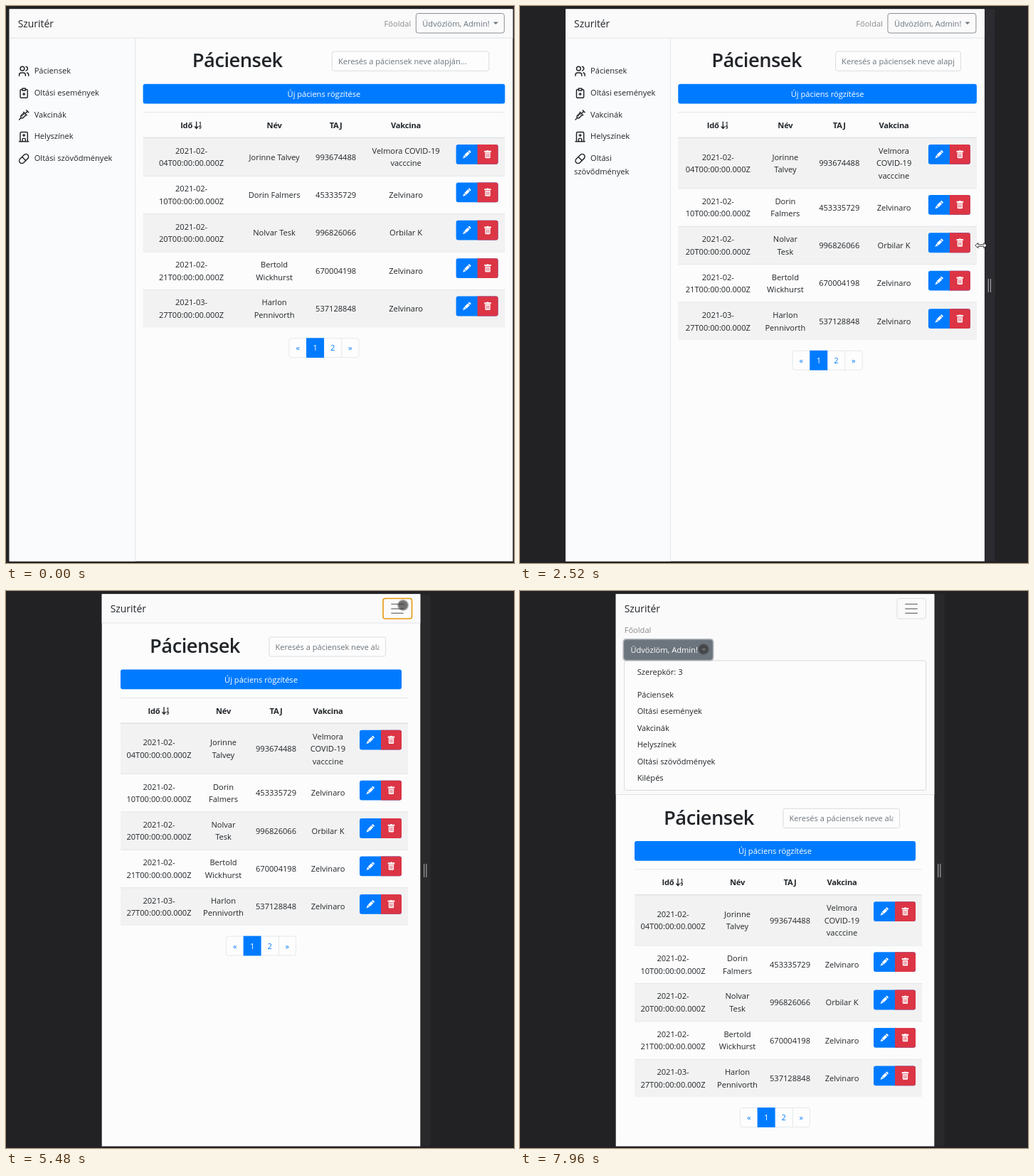
An HTML page that plays this animation: 714x784 px, repeating every 8000 ms.

```html
<!DOCTYPE html>
<html lang="hu">
<head>
<meta charset="utf-8">
<title>Páciensek</title>
<style>
html, body { margin: 0; width: 100%; height: 100%; overflow: hidden; background: #222224; }
#stage { display: block; width: 100%; height: 100%; font: 11.1px "Open Sans", "Noto Sans", sans-serif; fill: #212529; }
.mid { text-anchor: middle; }
.end { text-anchor: end; }
.brand { font-size: 13.9px; }
.title { font-size: 27.3px; font-weight: 600; letter-spacing: -.5px; }
.head { font-weight: 700; letter-spacing: -.2px; }
.tiny { font-size: 6.5px; font-weight: 700; }
.faint { fill: #8c8c8d; }
.gray { fill: #6c757d; }
.white { fill: #fff; }
.link { fill: #007bff; }
.icon { fill: none; stroke: #212529; stroke-width: 2; stroke-linecap: round; stroke-linejoin: round; }
</style>
</head>
<body>
<svg id="stage" viewBox="0 0 714 784">
  <defs>
    <radialGradient id="touch">
      <stop offset="0" stop-color="#333" stop-opacity=".72"/>
      <stop offset=".7" stop-color="#333" stop-opacity=".68"/>
      <stop offset="1" stop-color="#333" stop-opacity=".12"/>
    </radialGradient>
  </defs>
  <g id="scene"></g>
</svg>
<script>
const LOOP = 8000, STEP = 40;
const TOP = 4.4, BOTTOM = 781.6, NAV_BOTTOM = 45, CENTER = 358.5;
// The page is shown scaled down; sizes below follow from its CSS pixels
const SCALE = 0.7315, ROW = 73 * SCALE, LINE = 24 * SCALE, BUTTON = 38 * SCALE;
const LINE_COLOR = '#dee2e6', BLUE = '#007bff', RED = '#dc3545';

const MENU = ['Páciensek', 'Oltási események', 'Vakcinák', 'Helyszínek', 'Oltási szövődmények'];
const ICONS = [
  'M5 7a4 4 0 1 0 8 0a4 4 0 1 0-8 0M3 21v-2a4 4 0 0 1 4-4h4a4 4 0 0 1 4 4v2M16 3.1a4 4 0 0 1 0 7.8M21 21v-2a4 4 0 0 0-3-3.9',
  'M9 5H7a2 2 0 0 0-2 2v12a2 2 0 0 0 2 2h10a2 2 0 0 0 2-2V7a2 2 0 0 0-2-2h-2M9 3h6v4H9zM10 14h4M12 12v4',
  'M17 3l4 4M19 5l-4.5 4.5M11.5 6.5l6 6M16.5 11.5L10 18H6v-4l6.5-6.5M7.5 12.5L9 14M10.5 9.5L12 11M3 21l3-3',
  'M3 21h18M5 21V5a2 2 0 0 1 2-2h10a2 2 0 0 1 2 2v16M9 21v-4a2 2 0 0 1 2-2h2a2 2 0 0 1 2 2v4M10 9h4M12 7v4',
  'M4.5 12.5l8-8a4.9 4.9 0 0 1 7 7l-8 8a4.9 4.9 0 0 1-7-7M8.5 8.5l7 7'
];
const PENCIL = 'M12.2.1h.7l3 3v.7L14.2 5.5 10.5 1.8zM9.8 2.5l3.7 3.7L7 12.7 3.3 9zM2.7 9.6l3.7 3.7L.2 15.8z';
const TRASH = 'M1.5 1H6l1-1h2l1 1h4.5v3H1.5zM3 4.8h10V14a1.5 1.5 0 0 1-1.5 1.5h-7A1.5 1.5 0 0 1 3 14z';

// wrap: table width below which the name breaks into two lines
const PATIENTS = [
  { day: '2021-02-|04', name: 'Jorinne Talvey', wrap: 477, taj: '993674488', vaccine: 'Velmora COVID-19 vacccine' },
  { day: '2021-02-|10', name: 'Dorin Falmers', wrap: 463, taj: '453335729', vaccine: 'Zelvinaro' },
  { day: '2021-02-|20', name: 'Nolvar Tesk', wrap: 425, taj: '996826066', vaccine: 'Orbilar K' },
  { day: '2021-02-|21', name: 'Bertold Wickhurst', wrap: 999, taj: '670004198', vaccine: 'Zelvinaro' },
  { day: '2021-03-|27', name: 'Harlon Pennivorth', wrap: 999, taj: '537128848', vaccine: 'Zelvinaro' }
];

// table width, four column centres, left side of the row buttons
const COLUMNS = [[404, 54, 144.5, 218.5, 291.5, 336], [446.5, 59.5, 161, 240, 323.5, 378.5], [508, 68, 184.5, 271, 369.5, 440]];
const PANEL_LEFT = [[1640, 4.7], [2240, 46], [2480, 61], [2880, 91.7], [3320, 113], [3640, 129], [3840, 133], [3960, 133], [4080, 134.7]];
const RESIZE_CURSOR = [[1640, 712, 306], [2240, 668, 327], [2880, 622, 350], [3640, 586, 380], [4080, 584, 381]];
const TOUCH_TO_TOGGLE = [[4280, 584, 380], [4440, 566, 300], [4640, 545, 160], [4860, 534, 60], [5080, 558, 20]];

const clamp = v => Math.max(0, Math.min(1, v));
const lerp = (a, b, k) => a + (b - a) * k;

// Piecewise linear values over the first item of each key
function track(keys, at) {
  let i = 1;
  while (i < keys.length - 1 && keys[i][0] < at) i++;
  const a = keys[i - 1], b = keys[i], k = clamp((at - a[0]) / (b[0] - a[0]));
  return a.slice(1).map((v, n) => lerp(v, b[n + 1], k));
}

// y is the visual middle of the line
const text = (x, y, s, cls = '') => `<text x="${x}" y="${y + 4}" class="${cls}">${s}</text>`;
const lines = (x, y, list) =>
  list.map((s, i) => text(x, y + (i - (list.length - 1) / 2) * LINE, s, 'mid')).join('');
const rect = (x, y, w, h, fill, more = '') =>
  `<rect x="${x}" y="${y}" width="${w}" height="${h}" fill="${fill}" ${more}/>`;
const path = (x, y, scale, d, attrs) =>
  `<path transform="translate(${x} ${y}) scale(${scale})" d="${d}" ${attrs}/>`;
const outline = (color, width = .8) => `rx="3" stroke="${color}" stroke-width="${width}"`;

function adminButton(x, y, active) {
  const color = active > .5 ? 'white' : 'gray';
  const ring = active ? rect(x - .5, y - .5, 125, 28.5, 'none', `${outline('#6c757d', 3)} opacity="${active * .5}"`) : '';
  return ring + rect(x, y, 124, 27.5, '#6c757d', `${outline('#6c757d')} fill-opacity="${active}"`) +
    text(x + 9, y + 14, 'Üdvözlöm, Admin!', color) +
    path(x + 108.5, y + 12, 1, 'M0 0h7l-3.5 3.6z', `class="${color}"`);
}

function dropdown(x) {
  return rect(x + .4, 98, 424, 182.5, '#fcfcfc', outline('#cfd0d1')) +
    text(x + 18.5, 114, 'Szerepkör: 3') +
    [...MENU, 'Kilépés'].map((s, i) => text(x + 18.5, 146 + i * 23.4, s)).join('');
}

function navbar(left, right, wide, s) {
  const bottom = NAV_BOTTOM + s.offset;
  let out = rect(left, TOP, right - left, bottom - TOP, '#fafafb') +
    rect(left, bottom - .4, right - left, .9, '#dfe1e3') +
    text(left + 12, 26, 'Szuritér', 'brand');
  if (wide) return out + text(right - 143, 25, 'Főoldal', 'faint end') + adminButton(right - 136, 10.5, 0);

  out += rect(right - 52.3, 10.5, 40.5, 28.5, 'none', s.focus ? outline('#e8980f', 1.6) : outline('#d6d7d8')) +
    [18.5, 25, 31.3].map(y => rect(right - 41, y - .7, 17.5, 1.4, '#7d7d7e')).join('');
  if (s.offset) out += `<svg width="714" height="${bottom}">` +
    text(left + 12, 54.5, 'Főoldal', 'faint') +
    (s.active ? dropdown(left + 11.5) : '') +
    adminButton(left + 11.7, 69, s.active) + '</svg>';
  return out;
}

function sidebar(left, width) {
  const broken = width < 158, height = BOTTOM - NAV_BOTTOM;
  return rect(left, NAV_BOTTOM, width, height, '#fafbfc') +
    rect(left + width - .4, NAV_BOTTOM, .9, height, LINE_COLOR) +
    MENU.map((label, i) => {
      const y = 91 + i * 30.8;
      const icon = path(left + 11.7, y - 8, SCALE, ICONS[i], 'class="icon"');
      if (i < 4 || !broken) return icon + text(left + 35, y, label);
      const [first, second] = label.split(' ');
      return icon + text(left + 35, y, first) + text(left + 12, y + 18.6, second);
    }).join('');
}

function heading(titleX, inputX, inputRight, y) {
  const w = inputRight - inputX;
  return `<text x="${titleX}" y="${y + 86.3}" class="title mid">Páciensek</text>` +
    rect(inputX + .4, y + 64, w - .8, 27.3, '#fdfdfd', outline('#ced4da')) +
    `<svg x="${inputX + 9}" y="${y + 64}" width="${w - 18.5}" height="27">` +
    text(0, 14, 'Keresés a páciensek neve alapján...', 'gray') + '</svg>';
}

function rowButtons(x, y) {
  return rect(x, y, 59, BUTTON, BLUE, 'rx="3"') +
    `<path d="M${x + 30} ${y}h26a3 3 0 0 1 3 3v${BUTTON - 6}a3 3 0 0 1-3 3h-26z" fill="${RED}"/>` +
    path(x + 9.3, y + 8, SCALE, PENCIL, 'class="white"') +
    path(x + 38.6, y + 8, SCALE, TRASH, 'class="white"') +
    path(x + 38.6, y + 8, SCALE, 'M5.5 6.5v7M8 6.5v7M10.5 6.5v7', `stroke="${RED}"`);
}

// Returns the markup and the y of the table's end
function table(x, width, y) {
  const [day, name, taj, vaccine, buttons] = track(COLUMNS, width).map(v => v + x);
  let out = rect(x, y + 149.3, width, .8, LINE_COLOR) +
    text(day + 1.5, y + 168, 'Idő', 'head end') +
    path(day + 4.5, y + 162.5, 1, 'M2.5 0v9M0 7l2.5 3L5 7', 'fill="none" stroke="#212529" stroke-width="1.3"') +
    text(day + 10.5, y + 163.9, '1', 'tiny') + text(day + 10.5, y + 168.9, '9', 'tiny') +
    text(name, y + 168, 'Név', 'head mid') +
    text(taj, y + 168, 'TAJ', 'head mid') +
    text(vaccine, y + 168, 'Vakcina', 'head mid');
  let top = y + 185.5;
  PATIENTS.forEach((p, i) => {
    const words = p.vaccine.split(' ');
    const long = words.length > 2;
    const vaccineLines = !long ? [p.vaccine] : width < 488 ? words : [words.slice(0, 2).join(' '), words[2]];
    const height = ROW + (vaccineLines.length > 2 ? LINE : 0), mid = top + height / 2 + .4;
    if (i % 2 === 0) out += rect(x, top, width, height, '#f2f2f2');
    out += rect(x, top - (i ? 0 : .8), width, i ? .8 : 1.5, LINE_COLOR) +
      lines(day, mid, (p.day + 'T00:00:00.000Z').split('|')) +
      lines(name, mid, width < p.wrap ? p.name.split(' ') : [p.name]) +
      text(taj, mid, p.taj, 'mid') +
      lines(vaccine, mid, vaccineLines) +
      rowButtons(buttons, top + 9.5);
    top += height;
  });
  return [out, top];
}

function pagination(center, y) {
  const cell = 24.5, x = center - 2 * cell;
  return rect(x, y + .4, 4 * cell, BUTTON - .8, '#fdfdfd', outline(LINE_COLOR)) +
    rect(x + 3 * cell, y, .8, BUTTON, LINE_COLOR) +
    rect(x + cell - .4, y, cell + .5, BUTTON, BLUE) +
    ['«', '1', '2', '»'].map((s, i) => text(x + (i + .5) * cell, y + 14, s, i === 1 ? 'mid white' : 'mid link')).join('');
}

function content(left, right, wide, offset) {
  const side = wide ? (right - left) / 4 : 0;
  const start = left + side, main = right - start;
  const x = wide ? start + 11 : 161, width = wide ? main - 22 : 540 * SCALE;
  const y = wide ? 0 : SCALE + offset;
  const [rows, end] = table(x, wide ? width : 404, y);
  return (wide ? sidebar(left, side) : '') +
    (wide ? heading(start + main / 4 + 11, start + main / 2 + 11, right - 33, y) : heading(265.5, 369.5, 534, y)) +
    rect(x, y + 109.8, width, BUTTON, BLUE, 'rx="3"') +
    text(x + width / 2, y + 124, 'Új páciens rögzítése', 'mid white') +
    rows + pagination(x + width / 2, end + 14.8);
}

function pointer(t) {
  if (t < 1240) return '';
  if (t < 4320) {
    const [x, y] = track(RESIZE_CURSOR, t);
    return path(x, y, 1, 'M-8 0l4-3.8v2.6h8v-2.6l4 3.8-4 3.8v-2.6h-8v2.6z', 'fill="#fff" stroke="#222" stroke-width=".9"');
  }
  let [x, y] = track(TOUCH_TO_TOGGLE, t);
  if (t > 5920) {
    const p = clamp((t - 5920) / 800), k = p * p * (3 - 2 * p);
    x = lerp(558, 262, k);
    y = lerp(20, 82, k);
  }
  if (t >= 7720) x = t < 7960 ? 261 : 258;
  return `<circle cx="${x}" cy="${y}" r="8.3" fill="url(#touch)"/>`;
}

function draw(t) {
  const [left] = track(PANEL_LEFT, t), right = 2 * CENTER - left;
  const wide = right - left >= 768 * SCALE;
  const opening = 1 - (1 - clamp((t - 5480) / 320) ** 1.2) ** 2.4;
  const active = t < 7000 ? 0 : clamp((t - 6960) / 120);
  const state = { offset: active ? 241.5 : 57 * opening, active, focus: t >= 5480 && t < 7000 };
  const hover = t >= 1240 && t < 4320;
  return rect(right, TOP, 14.5, BOTTOM - TOP, hover ? '#2c2b30' : '#29282b') +
    [4.8, 8].map(dx => rect(right + dx, 384, 1.1, 19, '#a9a9ab')).join('') +
    rect(left, TOP, right - left, BOTTOM - TOP, '#fcfcfc') +
    content(left, right, wide, state.offset) +
    navbar(left, right, wide, state) +
    pointer(t);
}

const scene = document.getElementById('scene');
const start = performance.now();
let shown = -1;
function tick() {
  const t = Math.floor((performance.now() - start) % LOOP / STEP) * STEP;
  if (t !== shown) scene.innerHTML = draw(shown = t);
  requestAnimationFrame(tick);
}
tick();
</script>
</body>
</html>
```
